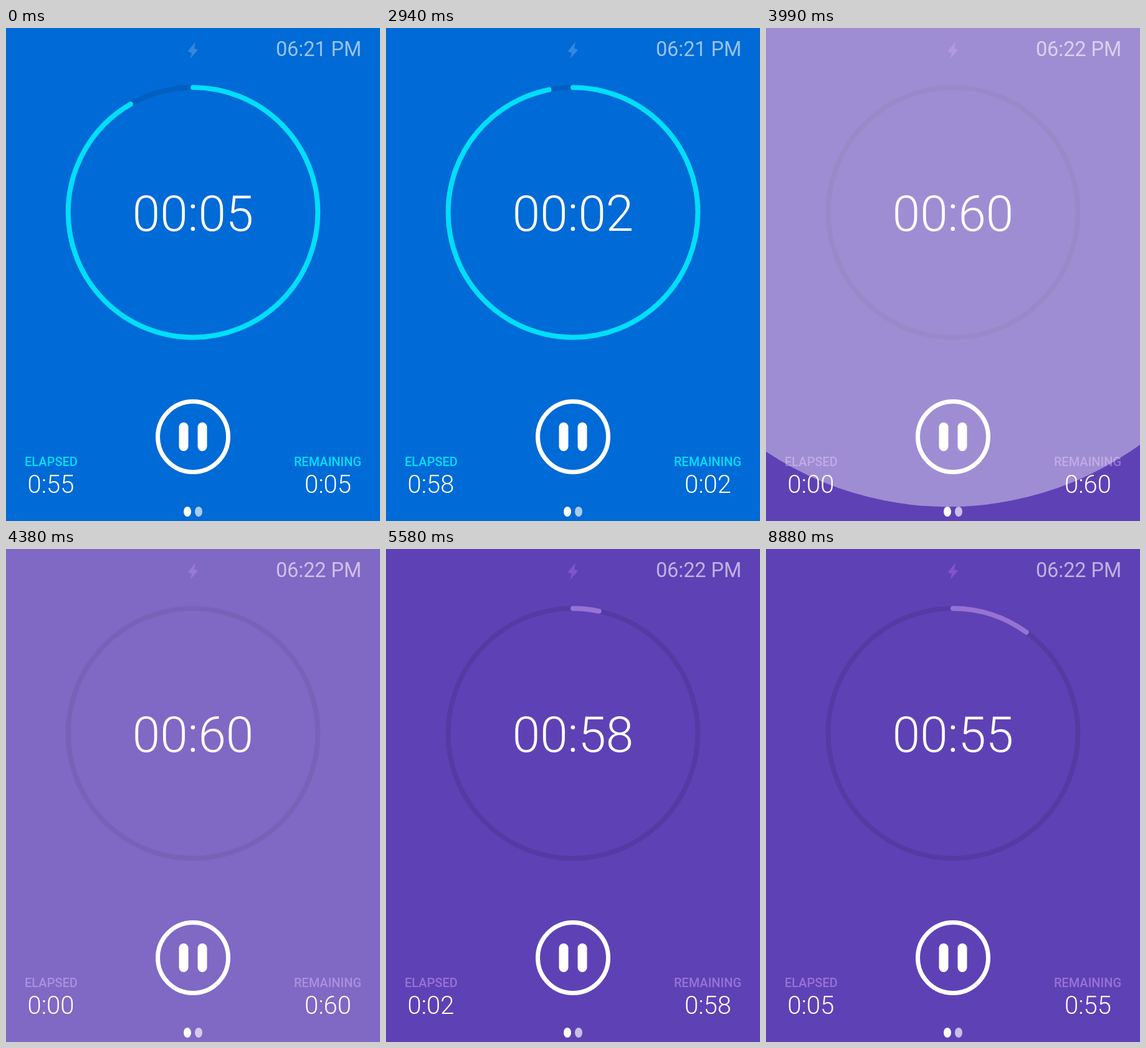
Animation of 600 by 790 pixels, one loop 8910 ms. Source, as an HTML page:

```html
<!DOCTYPE html>
<html lang="en">
<head>
<meta charset="utf-8">
<title>Countdown timer</title>
<style>
  html, body { margin: 0; width: 100%; height: 100%; overflow: hidden; }
  svg {
    display: block; width: 100%; height: 100%;
    --bg: #006ad6; --accent: #00dfff; --bolt: #3687de;
    background: var(--bg);
    font-family: Roboto, sans-serif;
    fill: #fff;
  }
  svg.purple { --bg: #5f41b6; --accent: #9673d3; --bolt: #7f55cb; }
  .line { fill: none; stroke-width: 8; }
  .track { stroke: #000; opacity: .1; }
  #arc { stroke: var(--accent); stroke-linecap: round; }
  .big { font-size: 80px; font-weight: 300; text-anchor: middle; }
  .value { font-size: 40px; font-weight: 300; text-anchor: middle; }
  .label { font-size: 20px; font-weight: 500; fill: var(--accent); }
  #clock { font-size: 32.4px; opacity: .6; }
  .end { text-anchor: end; }
  .bolt { fill: var(--bolt); }
</style>
</head>
<body>
<svg id="stage" viewBox="0 0 600 790">
  <path class="bolt" d="M304 22L291.5 37.5L298 40L295.5 49L308 35L302 32.5Z"/>
  <text id="clock" class="end" x="570.3" y="45"></text>

  <circle class="line track" cx="300" cy="295.5" r="200.3"/>
  <circle id="arc" class="line" cx="300" cy="295.5" r="200.3" pathLength="60" transform="rotate(-90 300 295.5)"/>
  <text id="main" class="big" x="300" y="325"></text>

  <circle cx="300" cy="655" r="56.5" fill="none" stroke="#fff" stroke-width="7"/>
  <rect x="277.5" y="632" width="15" height="46" rx="7.5"/>
  <rect x="307.5" y="632" width="15" height="46" rx="7.5"/>

  <text class="label" x="30" y="702">ELAPSED</text>
  <text id="elapsed" class="value" x="72" y="745"></text>
  <text class="label end" x="570" y="702">REMAINING</text>
  <text id="remaining" class="value" x="516.5" y="745"></text>

  <ellipse cx="291" cy="775" rx="6" ry="8"/>
  <ellipse cx="309" cy="775" rx="6" ry="8" opacity=".66"/>

  <circle id="ripple" cx="292" cy="241"/>
</svg>
<script>
  const LOOP = 8910, STEP = 30, FIRST = 55;
  const ARC_RESET = 3930, NEW_MINUTE = 3960, RIPPLE_TIME = 1600;
  // Each second: when the arc starts to move, when the digits change.
  const ticks = [
    [420, 630], [1320, 1500], [2160, 2310], [2940, 3090], [3810, NEW_MINUTE],
    [4650, 4800], [5430, 5580], [6270, 6450], [7140, 7320], [8010, 8160],
    [8820, Infinity]
  ];

  const $ = id => document.getElementById(id);
  const [stage, clock, arc, main, elapsed, remaining, ripple] =
    ['stage', 'clock', 'arc', 'main', 'elapsed', 'remaining', 'ripple'].map($);

  const pad = n => String(n).padStart(2, '0');
  const clamp = x => Math.min(1, Math.max(0, x));
  const smooth = x => x * x * (3 - 2 * x);
  const setText = (el, s) => { if (el.textContent !== s) el.textContent = s; };

  function drawArc(t) {
    let length = FIRST;
    for (const [start] of ticks) {
      if (t >= start) length += smooth(clamp((t - start) / 86 + .25));
    }
    if (t >= ARC_RESET) length -= 60;
    arc.style.strokeDasharray = `${Math.max(length, .01)} 120`;
    arc.style.visibility = t >= NEW_MINUTE && length < .01 ? 'hidden' : 'visible';
  }

  function drawRipple(t) {
    const age = t - ARC_RESET;
    const fade = age > 0 ? 1 - clamp(age / RIPPLE_TIME) : 0;
    ripple.setAttribute('r', Math.max(0, age * 8.77));
    ripple.setAttribute('opacity', .437 * fade ** 2.3);
  }

  function draw(t) {
    const seconds = (FIRST + ticks.filter(([, change]) => t >= change).length) % 60;
    const left = pad(60 - seconds);
    const newMinute = t >= NEW_MINUTE;
    stage.classList.toggle('purple', newMinute);
    setText(clock, newMinute ? '06:22 PM' : '06:21 PM');
    setText(main, '00:' + left);
    setText(elapsed, '0:' + pad(seconds));
    setText(remaining, '0:' + left);
    drawArc(t);
    drawRipple(t);
  }

  const begin = performance.now();
  function frame() {
    const t = (performance.now() - begin) % LOOP;
    draw(Math.floor(t / STEP) * STEP);
    requestAnimationFrame(frame);
  }
  frame();
</script>
</body>
</html>
```
